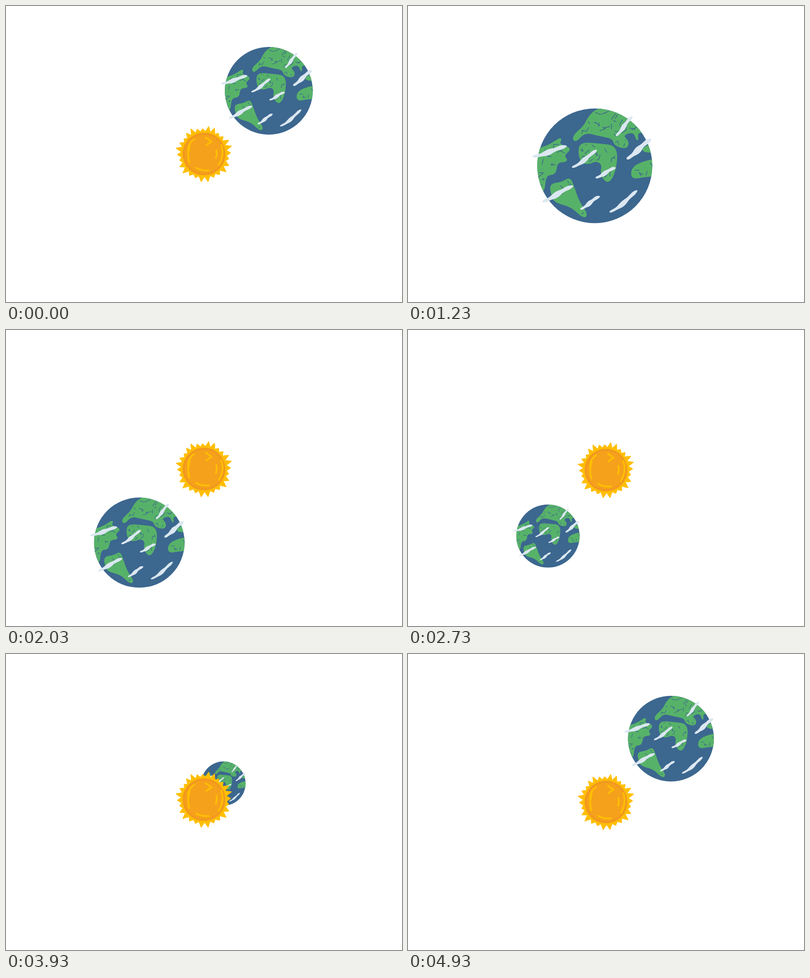
Animation, 800 px wide and 600 px high, one loop 5010 ms. Source, as an HTML page with a canvas:

```html
<!DOCTYPE html>
<html lang="en">
<head>
<meta charset="utf-8">
<title>Earth and sun</title>
<style>
  html, body { margin: 0; height: 100%; overflow: hidden; background: #fff; }
  canvas { display: block; }
</style>
</head>
<body>
<canvas id="stage" width="800" height="600"></canvas>
<script>
const ctx = document.getElementById('stage').getContext('2d');
const { sin, cos, PI } = Math;
const TAU = 2 * PI, LOOP = 5010, STEPS = 100;
const OCEAN = '#3c678f', LAND = '#57b269', CLOUD = '#dbe7f1';
const ORANGE = '#f5a11b', YELLOW = '#ffbe04', RING = '#f2981f';
const GLOBE = { x: 377.5, y: 323.5, r: 116.5 };

// Rough outlines of the continents, in globe coordinates.
const lands = new Path2D();
[
  '383,207 365,225 357,243 333,264 338,275 357,254 385,261 415,267 418,281 441,288 446,275 432,261 457,252 465,276 462,251 500,262 470,190',
  '255,292 285,283 311,265 303,281 330,288 313,302 323,314 300,315 298,340 277,341 274,380 250,370',
  '345,295 350,277 385,280 422,284 420,331 405,360 390,341 394,320 380,312 366,319 351,316',
  '288,361 312,358 327,348 334,366 345,398 362,422 355,429 330,405 297,397 290,380',
  '452,349 454,326 482,314 505,311 505,342 477,345',
  '468,292 500,276 500,297'
].forEach(text => {
  const points = text.split(' ').map(p => p.split(',').map(Number));
  lands.addPath(smooth(points));
});

// Start, end, half width and sag of each cloud.
const clouds = [
  [251, 305, 321, 283, 5, 1], [271, 397, 334, 364, 5, 0], [331, 327, 382, 291, 4.3, 2],
  [379, 348, 420, 327, 4, 0], [348, 412, 388, 385, 4, 0], [407, 418, 464, 373, 4.3, 3],
  [420, 263, 454, 223, 4, 0], [442, 310, 492, 269, 5.5, 0]
].map(ribbon);

const scratches = scribble(260);
const rays = sunRays(27);

// Closed curve through the midpoints of the given points.
function smooth(points) {
  const path = new Path2D();
  points.forEach(([x, y], n) => {
    const [px, py] = points.at(n - 1);
    const [nx, ny] = points[(n + 1) % points.length];
    if (!n) path.moveTo((x + px) / 2, (y + py) / 2);
    path.quadraticCurveTo(x, y, (x + nx) / 2, (y + ny) / 2);
  });
  path.closePath();
  return path;
}

// A strip with round ends whose thickness and middle line wobble.
function ribbon([x0, y0, x1, y1, width, sag]) {
  const dx = x1 - x0, dy = y1 - y0, length = Math.hypot(dx, dy), count = 24;
  const points = Array.from({ length: count }, (_, n) => {
    const a = TAU * n / count, u = (1 - cos(a)) / 2;
    const side = width * sin(a) * (1 + .3 * cos(14 * u)) + sag * sin(PI * u) + 1.2 * sin(TAU * u);
    return [x0 + u * dx - side * dy / length, y0 + u * dy + side * dx / length];
  });
  return smooth(points);
}

function scribble(count) {
  let seed = 7;
  const random = () => (seed = seed * 16807 % 2147483647) / 2147483647;
  const path = new Path2D();
  for (let n = 0; n < count; n++) {
    const x = GLOBE.x + (2 * random() - 1) * GLOBE.r;
    const y = GLOBE.y + (2 * random() - 1) * GLOBE.r;
    const angle = random() * PI, length = 5 + 9 * random();
    path.moveTo(x, y);
    path.lineTo(x + length * cos(angle), y + length * sin(angle));
  }
  return path;
}

function sunRays(count) {
  const path = new Path2D();
  for (let n = 0; n < 2 * count; n++) {
    const turn = PI * n / count;
    const angle = turn - .28 + .07 * (1 - cos(turn));
    const reach = n % 2 ? 45.5 : 54 + 3.5 * cos(.8375 * n);
    path.lineTo(reach * cos(angle), reach * sin(angle));
  }
  path.closePath();
  return path;
}

// Sum of harmonics: [cosine, sine] amplitudes for 1, 2, 3 ... turns per loop.
function wave(angle, mean, ...harmonics) {
  return harmonics.reduce((sum, [a, b], n) =>
    sum + a * cos((n + 1) * angle) + b * sin((n + 1) * angle), mean);
}

function disc(x, y, r) {
  ctx.beginPath();
  ctx.arc(x, y, r, 0, TAU);
}

function line(path, color, width) {
  ctx.strokeStyle = color;
  ctx.lineWidth = width;
  ctx.stroke(path);
}

function drawEarth(angle) {
  const offset = wave(angle, -3.9, [131.1, -18.3], [2, 6.5], [1.7, -1.5]);
  const radius = wave(angle, 80, [7.1, 35.4], [.8, .4], [.9, -1.6]);
  ctx.save();
  ctx.translate(400 + offset, 301.5 - .99 * offset);
  ctx.scale(radius / GLOBE.r, radius / GLOBE.r);
  ctx.translate(-GLOBE.x, -GLOBE.y);

  ctx.save();
  disc(GLOBE.x, GLOBE.y, GLOBE.r);
  ctx.fillStyle = OCEAN;
  ctx.fill();
  ctx.clip();
  ctx.fillStyle = LAND;
  ctx.fill(lands);
  ctx.save();
  ctx.clip(lands);
  line(scratches, OCEAN, 1.4);
  ctx.restore();
  line(lands, LAND, 3.5);
  ctx.restore();

  ctx.fillStyle = CLOUD;
  clouds.forEach(cloud => ctx.fill(cloud));
  ctx.restore();
}

const glints = new Path2D('M-20-30Q-33-22-32-4Q-32 8-30 17 M-29-17L-31-6 M35-18Q42 2 30 22 M25-8Q27 0 24 8 M-16 28Q-4 35 10 33 M4-33L15-25L5-18');

function drawSun(angle) {
  const lift = 9.15 * (cos(angle + .4 * sin(angle / 2)) - 1);
  ctx.save();
  ctx.translate(400, 300 + lift);
  ctx.fillStyle = YELLOW;
  ctx.fill(rays);
  line(rays, YELLOW, 1.5);
  disc(0, 0, 43);
  ctx.fillStyle = ORANGE;
  ctx.fill();
  disc(0, 0, 41);
  ctx.strokeStyle = RING;
  ctx.lineWidth = 4;
  ctx.stroke();
  line(glints, YELLOW, 3.6);
  ctx.restore();
}

const start = performance.now();
function draw() {
  // Two poses every 100 ms, held for 30 and 70 ms.
  const t = (performance.now() - start) % LOOP;
  const step = Math.min(STEPS - 1, 2 * Math.floor(t / 100) + (t % 100 >= 30));
  const layers = step < STEPS / 2 ? [drawSun, drawEarth] : [drawEarth, drawSun];
  ctx.clearRect(0, 0, 800, 600);
  ctx.lineCap = ctx.lineJoin = 'round';
  layers.forEach(layer => layer(TAU * step / STEPS));
  requestAnimationFrame(draw);
}
draw();
</script>
</body>
</html>
```
